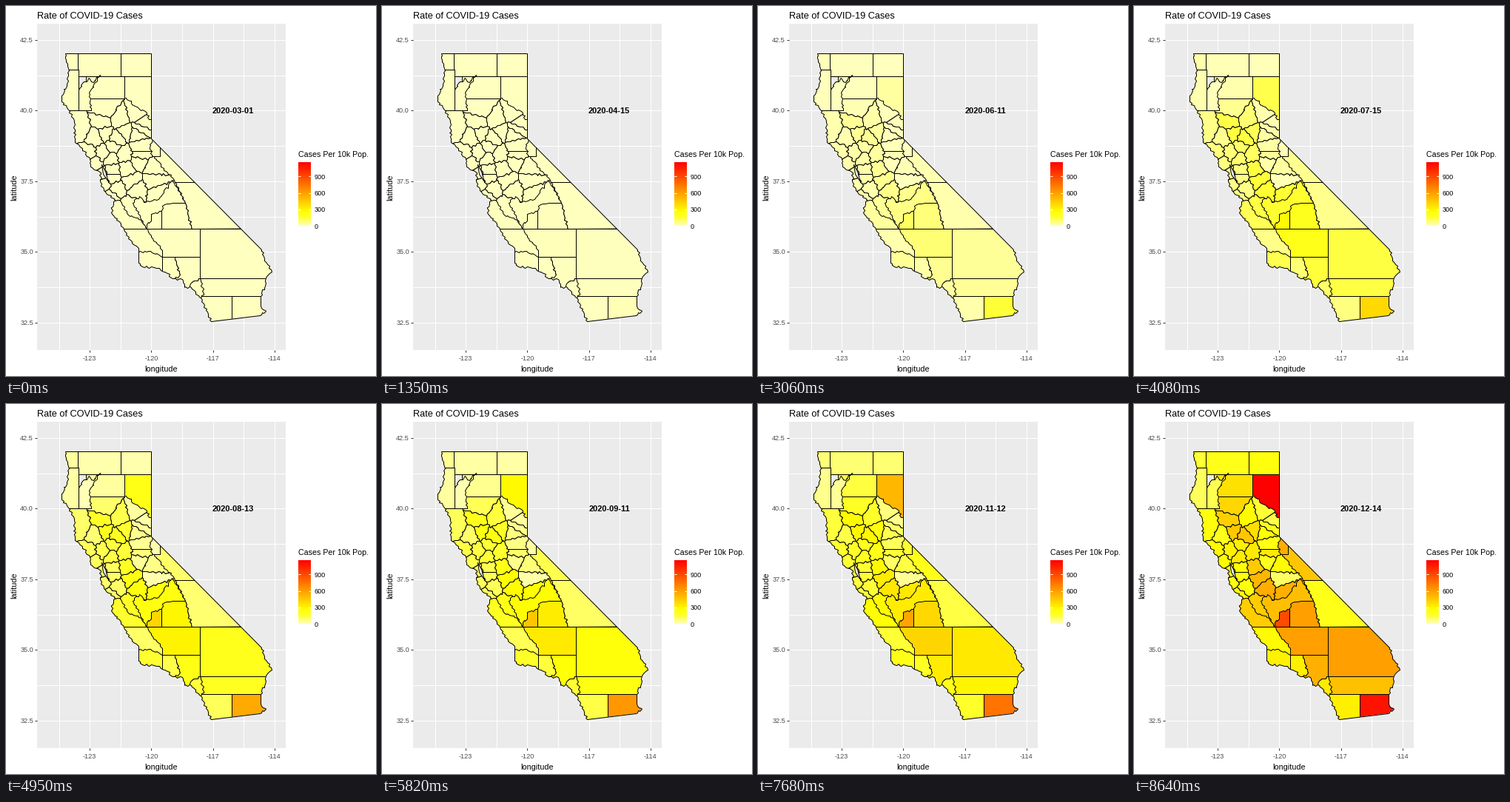
Write a matplotlib script that moves like this. It is 500 by 500 pixels and loops after 8.67 s.

```python
import numpy as np
import matplotlib.pyplot as plt
from matplotlib.animation import FuncAnimation
from matplotlib.collections import PolyCollection
from matplotlib.colors import LinearSegmentedColormap
from matplotlib.patches import Polygon, Rectangle

FRAMES, STEP = 289, 30
PANEL = "#EBEBEB"
MAX_RATE = 1147

plt.rcParams["font.family"] = "Liberation Sans"
heat = LinearSegmentedColormap.from_list("heat", [
    "#FFFFBF", "#FFFF40", "#FFFF00", "#FFDB00", "#FFB600",
    "#FF9200", "#FF6D00", "#FF4900", "#FF2400", "#FF0000"], N=1024)

shapes, shares, peaks = [], [], []


def rough(points):
    """Make slanted edges ragged; axis-aligned and long edges stay straight."""
    points = np.asarray(points, float)
    out = []
    for p, q in zip(points, np.roll(points, -1, axis=0)):
        length = np.hypot(*(q - p))
        straight = min(abs(q - p)) < 0.5 or length > 60
        n = 1 if straight else int(length // 3) + 1
        for u in np.arange(n) / n:
            x, y = p + u * (q - p)
            sway = 1.6 * np.sin(np.pi * u)
            out.append((x + sway * np.sin(0.9 * y + 0.3 * x),
                        y + sway * np.sin(0.8 * x - 0.4 * y)))
    return out


def county(share, peak, *xy):
    """share: part of the final rate that came with the summer wave."""
    shapes.append(rough(np.reshape(xy, (-1, 2))))
    shares.append(share)
    peaks.append(peak)


def box(share, peak, x0, y0, x1, y1):
    county(share, peak, x0, y0, x1, y0, x1, y1, x0, y1)


def nearer(poly, site, other):
    """Part of a polygon that is closer to site than to other."""
    normal, middle = other - site, (other + site) / 2
    out = []
    for p, q in zip(poly, np.roll(poly, -1, axis=0)):
        a, b = (p - middle) @ normal, (q - middle) @ normal
        if a <= 0:
            out.append(p)
        if a * b < 0:
            out.append(p + (q - p) * a / (a - b))
    return np.array(out)


# Small counties are the cells around these seats: x, y, final rate
mountain = [(134, 139, 400), (177, 146, 150), (184, 156.5, 120),
            (181, 164, 200), (177, 171, 250), (181, 189, 220),
            (181, 201, 330), (180, 207, 200), (200, 216, 270),
            (199, 236, 95)]
coast = [(99, 165, 230), (121, 176, 200), (110, 198, 280), (132, 197, 300),
         (119, 213, 260), (142, 204, 330), (144, 221, 260), (144, 230, 240),
         (127, 226, 210), (131, 240, 230), (149, 245, 240), (140, 256, 230)]
valley = [(130, 156, 420), (133, 171, 450), (153, 153, 270), (160, 168, 370),
          (149, 177, 450), (144, 190, 310), (158, 199, 330), (162, 219, 440),
          (168, 235, 510), (177, 247, 540), (204, 250, 530), (168, 268, 430)]
groups = [(0.27, mountain), (0.45, coast), (0.5, valley)]
seats = np.array([s[:2] for _, group in groups for s in group], float)
for share, group in groups:
    for x, y, peak in group:
        seat = np.array([x, y], float)
        cell = np.array([(60, 120), (260, 120), (260, 300), (60, 300)], float)
        for other in seats:
            if (other != seat).any():
                cell = nearer(cell, seat, other)
        county(share, peak, *cell.ravel())

# Large counties lie over the cells; north
box(0.13, 210, 90, 55, 155, 94)
box(0.1, 230, 155, 55, 205, 94)
box(0.13, 360, 108, 94, 160, 124)
county(0.24, 1150, 160, 94, 205, 94, 205, 152, 193, 152, 190, 143, 172, 133,
       169, 127, 160, 123)
box(0.3, 150, 65, 55, 97, 85)
box(0.33, 100, 65, 85, 98, 140)
county(0.13, 110, 98, 140, 98, 112, 103, 103, 112, 96, 118, 102, 127, 92,
       112, 116, 115, 140)
# East and centre
county(0.25, 460, 200, 204, 208, 180, 300, 180, 300, 237, 228, 237, 218, 224)
county(0.04, 540, 199, 174, 216, 184, 208, 190, 208, 202, 198, 202, 194, 190)
county(0.55, 480, 224, 234, 242, 265, 242, 300, 189, 300, 171, 265, 180, 256,
       186, 264, 206, 260)
county(0.45, 430, 120, 262, 153, 261, 166, 282, 178, 285, 191, 300, 120, 300)
county(0.55, 590, 210, 300, 210, 275, 214, 267, 225, 265, 242, 265, 251, 300)
county(0.52, 890, 190, 300, 190, 294, 196, 289, 196, 280, 210, 276, 210, 300)
# South
box(0.41, 590, 262, 300, 405, 367)
county(0.45, 210, 228, 237, 405, 237, 405, 299, 251, 300, 242, 265)
box(0.4, 270, 150, 300, 211, 345)
county(0.57, 590, 191, 300, 262, 300, 262, 338, 211, 338, 211, 329, 198, 313)
county(0.6, 300, 160, 333, 195, 330, 211, 338, 211, 370, 160, 370)
county(0.45, 310, 211, 338, 228, 338, 235, 362, 227, 375, 211, 375)
county(0.47, 530, 228, 338, 262, 338, 262, 367, 251, 372, 247, 385, 225, 385,
       227, 368, 235, 362)
box(0.47, 475, 262, 367, 405, 391)
box(0.4, 310, 255, 391, 305, 435)
county(0.48, 330, 251, 372, 262, 367, 267, 389, 262, 396, 240, 396)
box(0.58, 1080, 305, 391, 405, 435)

bay = [(129, 213), (134, 222), (138, 236), (131, 226)]

border = [80, 63, 196, 63, 196, 178, 345, 328, 349, 343, 359, 358, 351, 366,
          350, 377, 344, 391, 344, 404, 351, 411, 343, 417, 277, 425]
south = [272, 412, 263, 393, 248, 378, 241, 379, 238, 368, 225, 367, 216, 359,
         205, 353, 184, 351, 179, 346, 179, 326, 172, 321, 159, 300]
north = [144, 281, 142, 271, 147, 262, 134, 250, 127, 236, 128, 224, 114, 216,
         113, 205, 99, 188, 93, 181, 92, 154, 84, 139, 75, 128, 75, 122,
         83, 102, 84, 83, 81, 72]

# Summer wave is logistic and earlier where it was larger; winter is exponential
day = np.arange(FRAMES)
share = np.array(shares)[:, None]
summer = 1 / (1 + np.exp((155 - 50 * share - day) / 20))
winter = np.exp((day - FRAMES + 1) / 24)
curve = np.array(peaks)[:, None] * (share * summer + (1 - share) * winter)

fig = plt.figure(figsize=(5, 5), dpi=100, facecolor="white")
ax = fig.add_axes([0, 0, 1, 1])
ax.axis("off")


def px(size):
    return size * 0.72


def line(x, y, color="white", z=2):
    ax.plot(x, y, color=color, lw=px(1), solid_capstyle="butt", zorder=z)


def label(x, y, text, size=10.7, color="black", ha="left", **kw):
    return ax.text(x, y - 1, text, fontsize=px(size), color=color, ha=ha,
                   va=kw.pop("va", "center_baseline"), **kw)


# Panel, grid and axes
ax.add_patch(Rectangle((42, 23), 336, 441, fc=PANEL, ec="none", zorder=1))
for i, lon in enumerate((-123, -120, -117, -114)):
    x = 113.2 + 83.2 * i
    line([x - 41.6] * 2, [23, 464])
    line([x, x], [23, 464])
    line([x, x], [464, 467], "#333333")
    label(x, 475.5, str(lon), 9.2, "#4D4D4D", "center")
for i, lat in enumerate((42.5, 40.0, 37.5, 35.0, 32.5)):
    y = 44.8 + 95.5 * i
    if i < 4:
        line([42, 378], [y + 47.75] * 2)
    line([42, 378], [y, y])
    line([39, 42], [y, y], "#333333")
    label(37, y + 0.4, f"{lat}", 9.2, "#4D4D4D", "right")
label(42, 17, "Rate of COVID-19 Cases", 12.8, va="baseline")
label(210, 490, "longitude", ha="center")
label(11, 245, "latitude", ha="center", va="center", rotation=90)

# Legend
label(395, 200.5, "Cases Per 10k Pop.", 10.6)
ax.imshow(np.linspace(1, 0, 300)[:, None], cmap=heat, aspect="auto",
          extent=(395, 412, 296, 210), zorder=2)
for i in range(4):
    y = 296.5 - 22.5 * i
    line([395, 398], [y, y], z=3)
    line([409, 412], [y, y], z=3)
    label(416.6, y + 1, str(300 * i), 9.2)

# Map
outline = rough(np.reshape(border + south + north, (-1, 2)))
state = Polygon(outline, fc="none", ec="black", lw=px(1), snap=True, zorder=5)
ax.add_patch(state)
counties = PolyCollection(shapes + [bay], edgecolors="black",
                          linewidths=px(1), snap=True, zorder=4)
ax.add_collection(counties)
counties.set_clip_path(state)
date = label(307, 141, "", 11, ha="center", weight="bold", zorder=6)

# Whole numbers fall on pixel rows and columns
ax.set_xlim(0, 500)
ax.set_ylim(499, -1)

water = np.array([[235, 235, 235, 255]]) / 255


def draw(i):
    fills = heat(np.clip(curve[:, i] / MAX_RATE, 0, 1))
    counties.set_facecolor(np.vstack([fills, water]))
    date.set_text(str(np.datetime64("2020-03-01") + i))
    return counties, date


anim = FuncAnimation(fig, draw, frames=FRAMES, interval=STEP, repeat=True,
                     repeat_delay=0)
plt.show()
```
